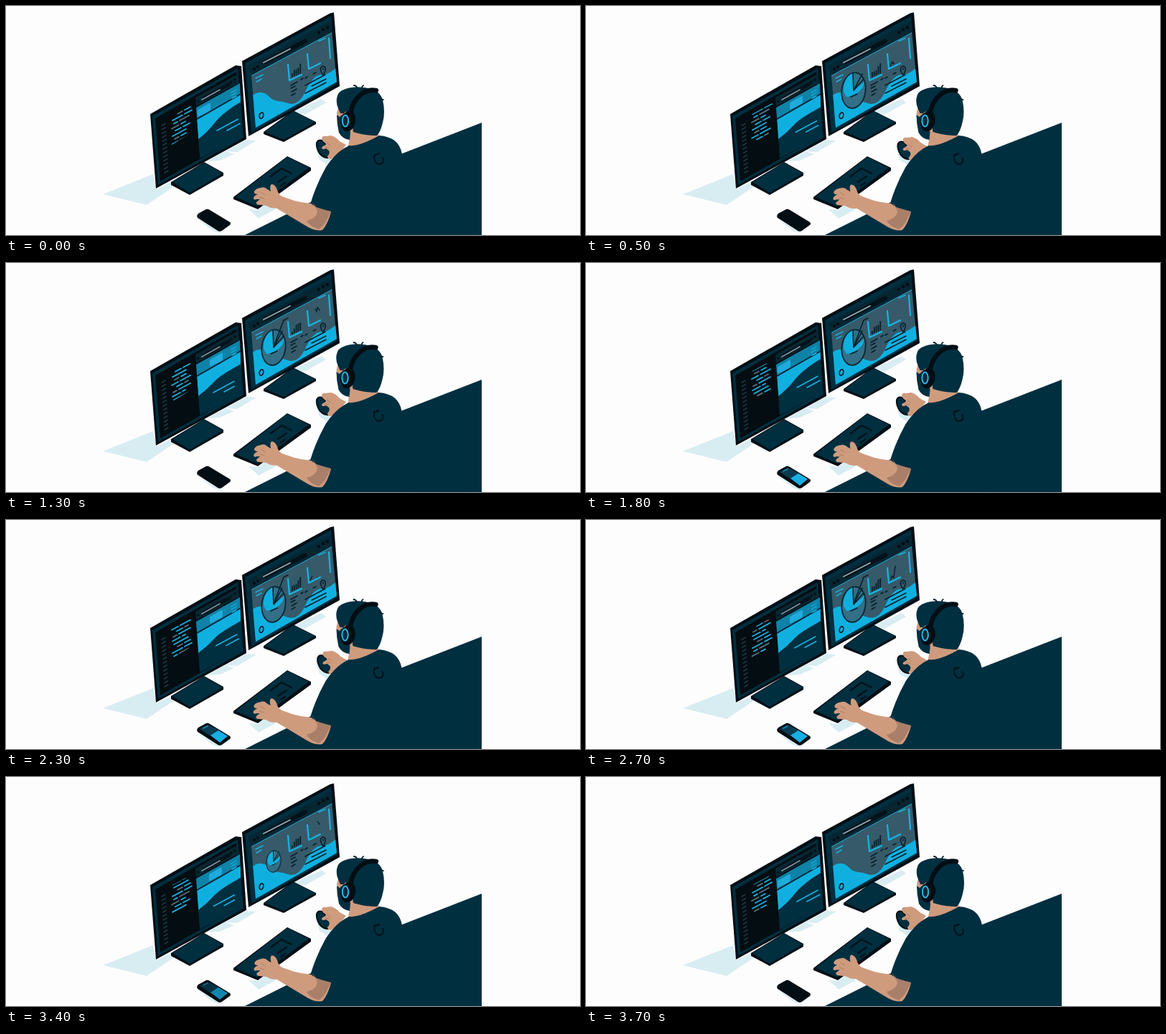
These frames come from a looping animation (800x320 px, 3.8 s). An HTML page:

```html
<!DOCTYPE html>
<html lang="en">
<head>
<meta charset="utf-8">
<title>Desk with two monitors</title>
<style>
html, body { margin: 0; width: 100%; height: 100%; overflow: hidden; background: #fefdfe; }
svg { display: block; width: 100vw; height: 100vh; }
.k { fill: #020e14; } .n { fill: #002f40; } .s { fill: #d8edf2; }
.skin { fill: #cf9b7d; } .shade { fill: #a97f69; } .b { fill: #0fb0e0; }
.l { fill: none; stroke-linecap: round; stroke-linejoin: round; }
.dark { stroke: #06202c; } .cyan { stroke: #18aedc; } .grey { stroke: #56707c; }
</style>
</head>
<body>
<svg viewBox="0 0 800 320">
  <defs>
    <clipPath id="codeClip"><path d="M228 153L261 135 263 174 231 194Z"/></clipPath>
    <clipPath id="pageClip"><path d="M265 142L326 108 329 181 270 213Z"/></clipPath>
    <clipPath id="dashClip"><path d="M342 97L454 37 461 106 348 170Z"/></clipPath>
  </defs>

  <!-- shadows -->
  <path class="s" d="M135 263L205 235 210 256 230 246 236 251 196 278ZM280 217L335 187 349 188 322 204 306 203 318 207 298 216ZM400 148L440 130 446 135 416 152ZM338 284L351 285 368 273 376 284 352 297ZM265 296L300 317 313 306 300 318 288 314ZM431 195L437 215 448 222 462 208Z"/>
  <path class="n" d="M333 320L425 274 550 207 663 163V320Z"/>

  <!-- left monitor -->
  <path class="k" d="M230 246L276 218 303 233V237L256 264 230 250Z"/>
  <path class="n" d="M232 246L276 219 302 234 256 261Z"/>
  <path class="k" d="M201 151L320 83 328 84 335 186 209 255Z"/>
  <path class="n" d="M204 154L323 87 331 184 212 250Z"/>
  <path fill="#040d11" d="M208 157L321 92 328 181 215 245Z"/>
  <g id="lineNos" class="l" stroke="#1c3844" stroke-width="1.6"></g>
  <g clip-path="url(#codeClip)"><g id="code" class="l" stroke-width="1.8"></g></g>
  <path fill="#072733" d="M264 128L323 95 325 107 265 140Z"/>
  <path class="l" stroke="#04131c" stroke-width="5" d="M276 129L311 109"/>
  <path class="l" stroke="#8095a0" stroke-width="1.7" d="M273 131L298 117"/>
  <circle class="k" cx="268" cy="133" r="1.5"/><circle class="k" cx="314" cy="106" r="1.8"/><circle class="k" cx="319" cy="103" r="1.8"/>
  <g clip-path="url(#pageClip)">
    <path class="n" d="M264 139L326 106 330 184 270 216Z"/>
    <path fill="#0f82a8" d="M264 140L326 106 327 124 266 158Z"/>
    <path id="pill" fill="#1fabdc" d="M-7 1L7 -7Q9 -8 9 -6V1Q9 3 7 4L-7 11Q-9 12 -9 10V4Q-9 2 -7 1Z"/>
    <path id="wave" class="b"/>
    <path class="l" stroke="#052838" stroke-width="1.8" d="M266 158L327 123"/>
    <path class="l cyan" stroke-width="1.4" d="M314 121L321 117M314 125L321 121M315 129L321 126"/>
    <path id="copy" class="l cyan" stroke-width="1.7"/>
  </g>

  <!-- right monitor -->
  <path class="k" d="M359 176L400 146 432 162V165L387 190 359 179Z"/>
  <path class="n" d="M361 176L400 147 431 162 387 187Z"/>
  <path class="k" d="M329 77L452 10 457 9 465 112 338 182Z"/>
  <path class="n" d="M333 80L453 14 461 109 342 177Z"/>
  <path fill="#062632" d="M337 84L452 21 455 38 342 98Z"/>
  <path class="l" stroke="#03131b" stroke-width="6" d="M362 78L417 49"/>
  <path class="l" stroke="#9aaab2" stroke-width="1.8" d="M359 79L396 60"/>
  <g class="k"><circle cx="346" cy="88" r="2"/><circle cx="351" cy="85" r="2"/><circle cx="436" cy="37" r="2.3"/><circle cx="442" cy="33" r="2.3"/><circle cx="448" cy="30" r="2.3"/></g>
  <g clip-path="url(#dashClip)">
    <path fill="#365a69" d="M341 97L455 36 463 108 348 172Z"/>
    <path class="b" d="M343 125C352 119 360 119 367 127C373 134 381 132 390 135C402 140 410 134 417 120C423 106 431 96 440 96C450 96 454 90 463 85V109L347 173Z"/>
    <path class="l cyan" stroke-width="1.6" d="M342 97L454 37"/>
    <g id="pie">
      <ellipse rx="16.5" ry="25" transform="rotate(8)" fill="#336f87" stroke="#092735" stroke-width="1.8"/>
      <path class="b" d="M0 0L-1 -24C-10 -21 -15 -10 -14 2L-10 9C-5 9 8 4 13 -5L15 -12Z"/>
      <path class="l dark" stroke-width="1.6" d="M0 0L-1 -24M0 0L14 -16M0 0L12 -23M-4 9L5 5"/>
    </g>
    <path id="callout" class="l dark" stroke-width="1.6" d="M373 117L387 80 393 77" pathLength="100"/>
    <path class="l cyan" stroke-width="1.6" d="M348 101L358 96M349 106L356 102M436 49L445 45"/>
    <path class="l" stroke="#18b4e4" stroke-width="2.2" d="M450 45L452 73M393 82L395 104 412 96M420 67L422 88 438 80"/>
    <g id="bars" class="l dark" stroke-width="1.8"></g>
    <path id="graph" class="l dark" stroke-width="1.4" d="M424 84L427 78 429 81 431 64 433 68 434 62 437 66" pathLength="100" stroke-dasharray="60 300"/>
    <path class="l dark" stroke-width="1.6" d="M397 111L406 106M397 115L403 112M398 120L405 116M398 125L403 122M411 103L414 101M417 101L420 99M428 95L432 93M417 111L445 96M426 112L446 102M417 122L446 107"/>
    <path class="l dark" stroke-width="1.6" d="M442 97Q437 89 439 86Q442 82 445 86Q446 90 442 97ZM442 87V89"/>
    <ellipse class="l dark" cx="356" cy="153" rx="2.7" ry="4.2" transform="rotate(15 356 153)" stroke-width="1.8"/>
  </g>

  <!-- keyboard and phone -->
  <path class="k" d="M317 267L392 210 425 226V230L351 284 317 270Z"/>
  <path class="n" d="M320 267L392 211 422 226 350 280Z"/>
  <path class="l" stroke="#03121a" stroke-width="2.3" d="M369 238L384 227 398 234M379 246L391 238M383 251L389 247"/>
  <path class="k" d="M268 290L279 284Q281 283 284 285L312 302Q314 304 312 306L301 314Q298 316 295 314L267 296Q265 293 268 290Z"/>
  <g id="phone">
    <path fill="#0b3b50" d="M270 292L281 286 297 294 285 302Z"/>
    <path fill="#18afe3" d="M285 301L296 294 309 302 298 311Z"/>
    <path class="l cyan" stroke-width="1.2" d="M275 291L281 288"/>
  </g>

  <!-- mouse hand -->
  <g id="mouse">
    <path class="n" stroke="#020e14" stroke-width="2" d="M433 191Q435 186 441 188L452 201 450 212Q443 213 437 206Q432 198 433 191Z"/>
    <path class="skin" d="M440 186Q440 181 446 182L453 181Q460 183 465 189L474 194 466 204 453 214Q448 214 448 210Q452 206 450 202L446 199Q442 201 440 199Q440 196 444 195L447 192Q442 191 440 186Z"/>
    <path class="l" stroke="#a97f69" d="M447 191L452 195M445 197L450 198"/>
  </g>

  <!-- person -->
  <g id="body">
    <path class="skin" d="M480 177L517 174 521 184 497 198 477 196Z"/>
    <path class="n" d="M478 195Q492 197 520 181Q548 183 552 207V320H444L453 288 432 283 425 274Q433 248 446 225Q458 207 471 199Z"/>
    <path class="l" stroke="#03121a" stroke-width="2" d="M514 207C512 212 514 220 520 221C526 221 527 215 525 212M520 206L515 208"/>
  </g>
  <g id="head">
    <path class="skin" d="M464 139L461 149 462 158 466 170 477 183 498 182 494 145Z"/>
    <path class="n" d="M461 152Q461 164 464 177Q469 186 479 187L480 177 474 147 465 155ZM461 129Q462 119 473 116Q484 112 500 114Q521 117 525 131Q529 149 525 163Q522 176 517 181Q499 181 484 176L480 150 466 150 463 143Q460 137 461 129Z"/>
    <path class="l dark" stroke-width="1.8" d="M489 114Q488 111 485 111M496 115Q496 112 498 111M520 129L526 131"/>
    <path class="l" stroke="#020e14" stroke-width="6.5" d="M480 151Q482 134 494 124Q504 116 516 118"/>
    <ellipse class="k" cx="477" cy="161" rx="10" ry="14.5" transform="rotate(12 477 161)"/>
    <ellipse cx="473" cy="160.500" rx="4.200" ry="8" fill="#0a2b3a" stroke="#28b6e5" stroke-width="2"/>
  </g>

  <!-- typing arm -->
  <g id="arm">
    <path class="skin" d="M376 262Q400 274 425 276L432 281 453 288Q448 306 441 313Q432 315 421 309L376 282 362 276Z"/>
    <path class="shade" d="M426 273L433 282 453 287Q450 293 447 299Q443 307 436 312Q422 307 419 300Q434 296 434 286Z"/>
    <g id="hand">
      <path class="skin" d="M346 259Q348 255 355 254Q360 252 364 256L369 259Q367 251 370 249Q376 249 379 260L384 267 379 282Q370 284 363 279L354 278Q348 278 349 274L354 270 349 270Q345 272 345 268Q346 265 351 263Q345 263 346 259Z"/>
      <path class="l" stroke="#a97f69" d="M355 260L361 264M354 267L360 269"/>
    </g>
  </g>
</svg>
<script>
const LOOP = 3800, HALF = LOOP / 2, STEP = 100, ROW = 5.5, ROWS = 12;
const $ = id => document.getElementById(id);
const move = (id, x, y, extra = '') => $(id).setAttribute('transform', `translate(${x} ${y})${extra}`);
const ramp = (t, a, b) => {
  const u = Math.min(1, Math.max(0, (t - a) / (b - a)));
  return u * u * (3 - 2 * u);
};
const pulse = (t, a, b, c, d) => ramp(t, a, b) - ramp(t, c, d);
const mix = (a, b, u) => a + (b - a) * u;
const slant = (x, y, w) => `M${x} ${y}l${w} ${-w * 0.54}`;
const dash = (x, y, w, cls = '') => `<path class="${cls}" d="${slant(x, y, w)}"/>`;

$('lineNos').innerHTML = Array.from({ length: 13 }, (_, i) => dash(217 + i * 0.33, 167 + i * 5.5, 5)).join('');

// Each row: indent, then the widths of its pieces.
const rows = [[8, 7, 8], [1, 14, 10], [3, 5, 13], [0, 10, 6], [5, 8, 9], [1, 19], [4, 6, 7], [0, 9, 14], [7, 8, 5], [2, 5, 16], [1, 11, 4], [3, 20]];
let code = '';
for (let i = 0; i < ROWS * 2 + 2; i++) {
  let [x, ...parts] = rows[i % ROWS];
  parts.forEach((w, j) => {
    code += dash(231 + x, 155 + i * ROW - x * 0.54, w, (i + j) % 3 ? 'cyan' : 'grey');
    x += w + 3;
  });
}
$('code').innerHTML = code;

function draw(t) {
  const turn = 2 * Math.PI * t / LOOP, half = t % HALF;
  move('code', 0, -t / LOOP * ROWS * ROW);

  // The page carousel runs twice per loop.
  const p = pulse(half, 50, 400, 1450, 1750);
  move('pill', mix(276, 293, p), mix(143, 133, p));
  $('wave').setAttribute('d', `M266 159L327 124V${mix(134, 141, p)}C${mix(314, 318, p)} ${mix(142, 147, p)} 302 ${mix(150, 154, p)} 291 ${mix(163, 165, p)}Q281 176 268 186Z`);
  const q = pulse(half, 0, 1300, 1450, 1750);
  $('copy').setAttribute('d', slant(mix(294, 289, q), mix(174, 181, q), 29) + slant(mix(308, 304, q), mix(174, 180, q), mix(18, 14, q)));

  const s = pulse(t, 50, 400, 3250, 3600);
  move('pie', 373, 118, ` scale(${s})`);
  const c = pulse(t, 650, 1000, 2750, 3050);
  $('callout').style.strokeDasharray = `${c * 100} 200`;
  $('callout').style.opacity = c > 0 ? 1 : 0;

  $('bars').innerHTML = [0, 1, 2, 3, 4].map(i => {
    const h = 4 + i * 1.8 + 1.8 * Math.sin(turn * 2 + i * 1.7);
    return `<path d="M${399 + i * 2.8} ${99 - i * 1.4}v${-h}"/>`;
  }).join('');

  const g = (half - 285) / 1300;
  $('graph').style.strokeDashoffset = 60 - g * 160;
  $('graph').style.opacity = g > 0 && g < 1 ? 1 : 0;

  $('phone').style.opacity = pulse(t, 1400, 1700, 3300, 3600);

  const reach = pulse(half, 100, 500, 850, 1200);
  move('mouse', 1.6 * reach, 2 * reach);
  const lean = pulse(t, 0, 500, 2500, 3000);
  move('head', -0.5 * lean, 0);
  move('body', -0.5 * lean, 0);
  move('hand', 0.6 * Math.sin(turn * 6), 0.6 * Math.sin(turn * 9));
}

function tick(now) {
  draw(Math.floor(now % LOOP / STEP) * STEP);
  requestAnimationFrame(tick);
}
draw(0);
requestAnimationFrame(tick);
</script>
</body>
</html>
```
